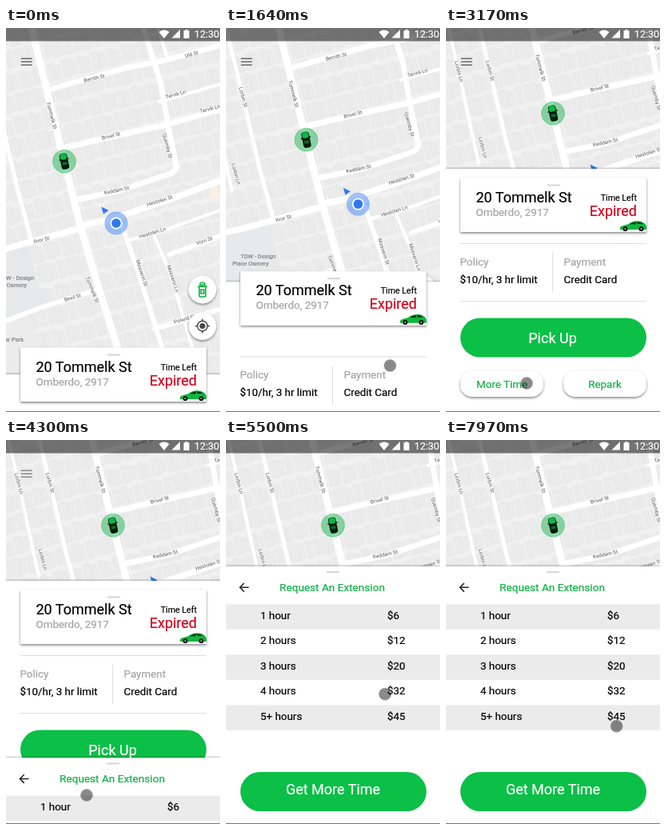
Recreate the animation shown at these times as an HTML page. Size 268 by 480 pixels, loop 8 s.

```html
<!DOCTYPE html>
<html lang="en">
<head>
<meta charset="utf-8">
<title>Parking pick-up</title>
<style>
html, body { margin: 0; width: 100%; height: 100%; overflow: hidden; background: #fff; }
svg { display: block; width: 100%; height: 100%; }
text { font-family: Roboto, "Open Sans", sans-serif; font-size: 13.4px; color: #000; fill: currentColor; stroke: currentColor; stroke-width: .2px; }
.big { font-size: 18px; }
.mid { text-anchor: middle; }
.end { text-anchor: end; }
.soft { color: #a3a3a3; }
.green { color: #0bb042; }
.white { color: #fff; }
.red { color: #d0021b; }
.road { fill: none; stroke: #fff; stroke-linejoin: round; stroke-linecap: round; }
.label { font-size: 6.5px; fill: #555; text-anchor: middle; stroke: #fff; stroke-width: 1.4px; paint-order: stroke; }
.place { font-size: 7.4px; color: #7b7f86; text-anchor: end; }
.rule { stroke: #dedede; stroke-width: 1; }
.grip { stroke: #d4d4d4; stroke-width: 2; }
</style>
</head>
<body>
<svg viewBox="0 0 268 480" preserveAspectRatio="none">
  <defs>
    <pattern id="lots" width="38" height="54" patternUnits="userSpaceOnUse" patternTransform="rotate(-14)">
      <rect width="38" height="54" fill="#f1f1f1"/>
      <g fill="#ebebeb" stroke="#e4e4e4" stroke-width=".6">
        <rect x="1" y="3" width="8" height="21"/>
        <rect x="9" y="6" width="7" height="18"/>
        <rect x="19" y="2" width="9" height="22"/>
        <rect x="28" y="5" width="8" height="17"/>
        <rect x="2" y="29" width="7" height="20"/>
        <rect x="11" y="28" width="8" height="23"/>
        <rect x="19" y="31" width="7" height="18"/>
        <rect x="29" y="29" width="8" height="21"/>
      </g>
    </pattern>
    <filter id="lift" x="-20%" y="-30%" width="140%" height="170%">
      <feDropShadow dx="0" dy="1.5" stdDeviation="1.5" flood-color="#000" flood-opacity=".5"/>
    </filter>
    <filter id="edge" x="-5%" y="-5%" width="110%" height="110%">
      <feDropShadow dx="0" dy="-1" stdDeviation="1.2" flood-color="#000" flood-opacity=".28"/>
    </filter>
  </defs>

  <g id="map">
    <rect x="-90" y="-10" width="390" height="520" fill="url(#lots)"/>
    <path d="M-90 299L28 271L42 326L60 340L0 366L-90 380Z" fill="#e8e9ea"/>
    <path d="M-90 386L0 369L30 361L46 412L-90 440Z" fill="#ececec"/>
    <path d="M253 190L261 187L268 212L257 216Z" fill="#fbf0e4"/>
    <g id="roads"></g>
    <g id="labels"></g>
    <text class="place" x="35" y="315">TDW - Design</text>
    <text class="place" x="26" y="324">Place Osmery</text>
    <text class="place" x="22" y="392">Car Park</text>
    <g transform="translate(73 166.7)">
      <circle r="14.5" fill="#0bb042" fill-opacity=".45" stroke="#0bb042" stroke-opacity=".35"/>
      <g transform="rotate(-12)">
        <rect x="-4.8" y="-10" width="9.6" height="20" rx="3.2" fill="#061a0b"/>
        <rect x="-4" y="-9.6" width="8" height="7.4" rx="2.6" fill="#10b548"/>
        <rect x="-3" y="1" width="6" height="3.5" rx="1" fill="#0a6a2b"/>
        <path d="M-6.3 -2.6H-4M4 -2.6H6.3" stroke="#061a0b" stroke-width="1.3"/>
      </g>
    </g>
  </g>

  <g id="user">
    <circle cx="138" cy="244" r="14.5" fill="#4285f4" opacity=".5"/>
    <circle cx="138" cy="244" r="7.5" fill="#fff"/>
    <circle cx="138" cy="244" r="5.8" fill="#2f78ee"/>
    <path d="M119.5 223.5L128.5 228L122 232.5Z" fill="#2f78ee"/>
  </g>

  <g id="menu" stroke="#6b6b6b" stroke-width="1.5">
    <path d="M18.7 38.2H32.7M18.7 42.2H32.7M18.7 46.2H32.7"/>
  </g>

  <g fill="#fff" filter="url(#lift)">
    <circle cx="246" cy="327" r="17.3"/>
    <circle cx="246" cy="372.5" r="17.3"/>
  </g>
  <g fill="none" stroke="#0bb042" stroke-width="1.6">
    <rect x="242" y="323" width="8" height="13" rx="1.8"/>
    <path d="M243 321V319.4Q246 316.6 249 319.4V321ZM240 323H252M244.2 327H247.8V332H244.2Z"/>
  </g>
  <g fill="none" stroke="#484848" stroke-width="1.5">
    <circle cx="246" cy="372.5" r="6.3"/>
    <circle cx="246" cy="372.5" r="3.6" fill="#484848" stroke="none"/>
    <path d="M246 363.5V366.5M246 378.5V381.5M237 372.5H240M252 372.5H255"/>
  </g>

  <g id="sheet">
    <rect x="-10" y="176" width="288" height="580" fill="#fff" filter="url(#edge)"/>
    <path class="rule" d="M18 269.5H251M18 341.5H251M133.5 281V330"/>
    <text class="soft" x="17.5" y="296.5">Policy</text>
    <text x="17.5" y="318.5">$10/hr, 3 hr limit</text>
    <text class="soft" x="147.5" y="296.5">Payment</text>
    <text x="147.5" y="318.5">Credit Card</text>
    <rect x="18" y="362.5" width="233" height="49" rx="24.5" fill="#0bbf47"/>
    <text class="big mid white" x="133.5" y="393.5">Pick Up</text>
    <g fill="#fff" filter="url(#lift)">
      <rect x="18" y="428.5" width="104" height="32.5" rx="15"/>
      <rect x="147" y="428.5" width="104" height="32.5" rx="15"/>
    </g>
    <text class="mid green" x="70" y="450">More Time</text>
    <text class="mid green" x="199" y="450">Repark</text>
  </g>

  <g id="card">
    <rect x="18" y="187.5" width="233" height="67.5" fill="#fff" filter="url(#lift)"/>
    <path class="grip" d="M127 196.5H143"/>
    <text class="big" x="37.5" y="217.5">20 Tommelk St</text>
    <text class="soft" x="37.5" y="234.5">Omberdo, 2917</text>
    <text class="end" x="239" y="215.5" style="font-size:10.7px">Time Left</text>
    <text class="big end red" x="239" y="234.5">Expired</text>
    <g transform="translate(217 240)">
      <path d="M1 12Q0 8.2 4 7.2L11 5.2Q16 1.2 22 1.2Q28 1 32 4.6Q34.6 7 34 12Z" fill="#10b53f"/>
      <path d="M13 5.4Q17 2.2 21 2.2V5.2ZM22.3 2.2Q27 2 30 5H22.3Z" fill="#14331d"/>
      <circle cx="7.5" cy="11.2" r="2.9"/>
      <circle cx="27.5" cy="11.2" r="2.9"/>
      <circle cx="7.5" cy="11.2" r="1.1" fill="#bbb"/>
      <circle cx="27.5" cy="11.2" r="1.1" fill="#bbb"/>
    </g>
  </g>

  <g id="extend">
    <rect x="-10" y="158" width="288" height="360" fill="#fff" filter="url(#edge)"/>
    <path class="grip" d="M126 165.2H142"/>
    <path d="M28.5 184.3H17.5M22.7 179L17.4 184.3L22.7 189.6" fill="none" stroke="#222" stroke-width="1.5"/>
    <text class="mid green" x="133" y="189" style="font-size:13.6px">Request An Extension</text>
    <g id="rows"></g>
    <rect x="18" y="415" width="233" height="49" rx="24.5" fill="#0bbf47"/>
    <text class="big mid white" x="134" y="443">Get More Time</text>
  </g>

  <rect width="268" height="16.5" fill-opacity=".52"/>
  <rect y="479" width="268" height="1" fill="#777"/>
  <g fill="#fff">
    <path d="M191.5 5Q198 .2 204.5 5L198 13Z"/>
    <path d="M207.5 12.5L218 2V12.5Z"/>
    <path d="M222.5 3.2H224.6V2H227.4V3.2H229.5V13H222.5Z"/>
    <text class="end white" x="267" y="12" style="font-size:12.5px">12:30</text>
  </g>

  <circle id="dot" r="7.6" fill-opacity=".46" stroke="#aaa" stroke-opacity=".6" stroke-width="1"/>
</svg>
<script>
const $ = id => document.getElementById(id);

const roads = [
  [9, "M32 0L73 167L93 247L112 312L146 420"],
  [5, "M-34 0L-7 110L14 200L32 266"],
  [4, "M-72 0L-46 110L-20 230"],
  [7, "M50 78L150 50L200 40L290 16"],
  [7, "M68 151L132 136L200 121L290 96"],
  [7, "M172 0L194 70L203 122L213 170Q215 178 206 182"],
  [7, "M86 215L140 204L206 182"],
  [8, "M93 247L135 238L200 216L290 183"],
  [8, "M-90 297L0 276L93 250"],
  [4, "M152 266L200 252L290 220"],
  [6, "M205 283L290 252"],
  [6, "M0 366L45 349L118 326"],
  [6, "M142 238L166 306L205 430"],
  [4, "M185 258L208 313L242 430"],
  [6, "M186 376L224 365L290 345"],
  [4, "M192 92L290 64"],
  [4, "M190 0L203 40"]
];
$("roads").innerHTML = roads.map(([w, d]) =>
  `<path class="road" stroke-width="${w}" d="${d}"/>`).join("");

const labels = [
  ["Tommelk St", 55, 110, 75], ["Tommelk St", 106, 328, 68],
  ["Berrith St", 111, 65, -13], ["Uld St", 233, 35, -16],
  ["Tervik Ln", 213, 85, -16], ["Tervik Ln", 256, 103, -15],
  ["Brivel St", 132, 137, -14], ["Quemby St", 200, 148, 75],
  ["Keddam St", 139, 205, -12], ["Hestolen St", 193, 218, -17],
  ["Hestolen Ln", 184, 258, -17], ["Ilvor St", 45, 267, -14],
  ["Vorn St", 249, 268, -18], ["Bexil St", 84, 339, -16],
  ["Mosverin St", 168, 307, 72], ["Mosverin Ln", 207, 314, 72],
  ["Polwid St", 224, 366, -16], ["Lorbin St", -8, 114, 75],
  ["Lorbin Ln", -47, 115, 75], ["Lorbin Ln", -17, 210, 75]
];
$("labels").innerHTML = labels.map(([s, x, y, a]) =>
  `<text class="label" transform="translate(${x} ${y}) rotate(${a})">${s}</text>`).join("");

const prices = [["1 hour", 6], ["2 hours", 12], ["3 hours", 20], ["4 hours", 32], ["5+ hours", 45]];
$("rows").innerHTML = prices.map(([s, cost], i) => {
  const y = 205.3 + i * 31.5;
  const band = i % 2 ? "" : `<rect y="${y}" width="268" height="31.5" fill="#ebebeb"/>`;
  return `${band}<text x="43" y="${y + 18.3}">${s}</text><text x="202" y="${y + 18.3}">$${cost}</text>`;
}).join("");

// cubic-bezier(.42, 0, .58, 1)
function ease(x) {
  if (x <= 0) return 0;
  if (x >= 1) return 1;
  let lo = 0, hi = 1;
  for (let i = 0; i < 20; i++) {
    const s = (lo + hi) / 2, r = 1 - s;
    if (1.26 * r * r * s + 1.74 * r * s * s + s ** 3 < x) lo = s; else hi = s;
  }
  return lo * lo * (3 - 2 * lo);
}

// Progress from start over dur, held at 0 until the cue.
const run = (t, cue, start, dur) => t < cue ? 0 : ease((t - start) / dur);

// cue, start, duration, from, control, to
const moves = [
  [500, 370, 400, [276, 362], [240, 392], [205.5, 422]],
  [2640, 2570, 600, [205.5, 422], [153, 433], [101, 444]],
  [5170, 4970, 1000, [101, 444], [211, 324], [244, 225]],
  [6100, 6040, 130, [244, 225], [244, 223], [244, 222]],
  [6440, 6240, 1000, [244, 222], [226, 285], [235, 339.5]],
  [7300, 7200, 300, [235, 339.5], [235, 340], [235.5, 341]],
  [7840, 7770, 420, [235.5, 341], [212, 359], [188, 377]]
];

function cursor(t) {
  let m;
  for (const step of moves) if (t >= step[0]) m = step;
  if (!m) return [-30, -30];
  const [cue, start, dur, a, c, b] = m;
  const p = run(t, cue, start, dur), q = 1 - p;
  return a.map((v, i) => q * q * v + 2 * p * q * c[i] + p * p * b[i]);
}

const place = (id, x, y) => $(id).setAttribute("transform", `translate(${x} ${y})`);

function draw(t) {
  const up = run(t, 1370, 1175, 990);
  const ext = run(t, 4100, 3950, 1000);
  place("map", 61 * up, -60 * up);
  place("user", 61 * up, -53 * up);
  place("sheet", 0, 257 * (1 - up));
  place("card", 0, 212 * (1 - up));
  place("extend", 0, ext ? 322 * (1 - ext) : 340);
  $("menu").setAttribute("opacity", 1 - ext);
  place("dot", ...cursor(t));
}

const t0 = performance.now();
function tick() {
  draw((performance.now() - t0) % 8000);
  requestAnimationFrame(tick);
}
tick();
</script>
</body>
</html>
```
